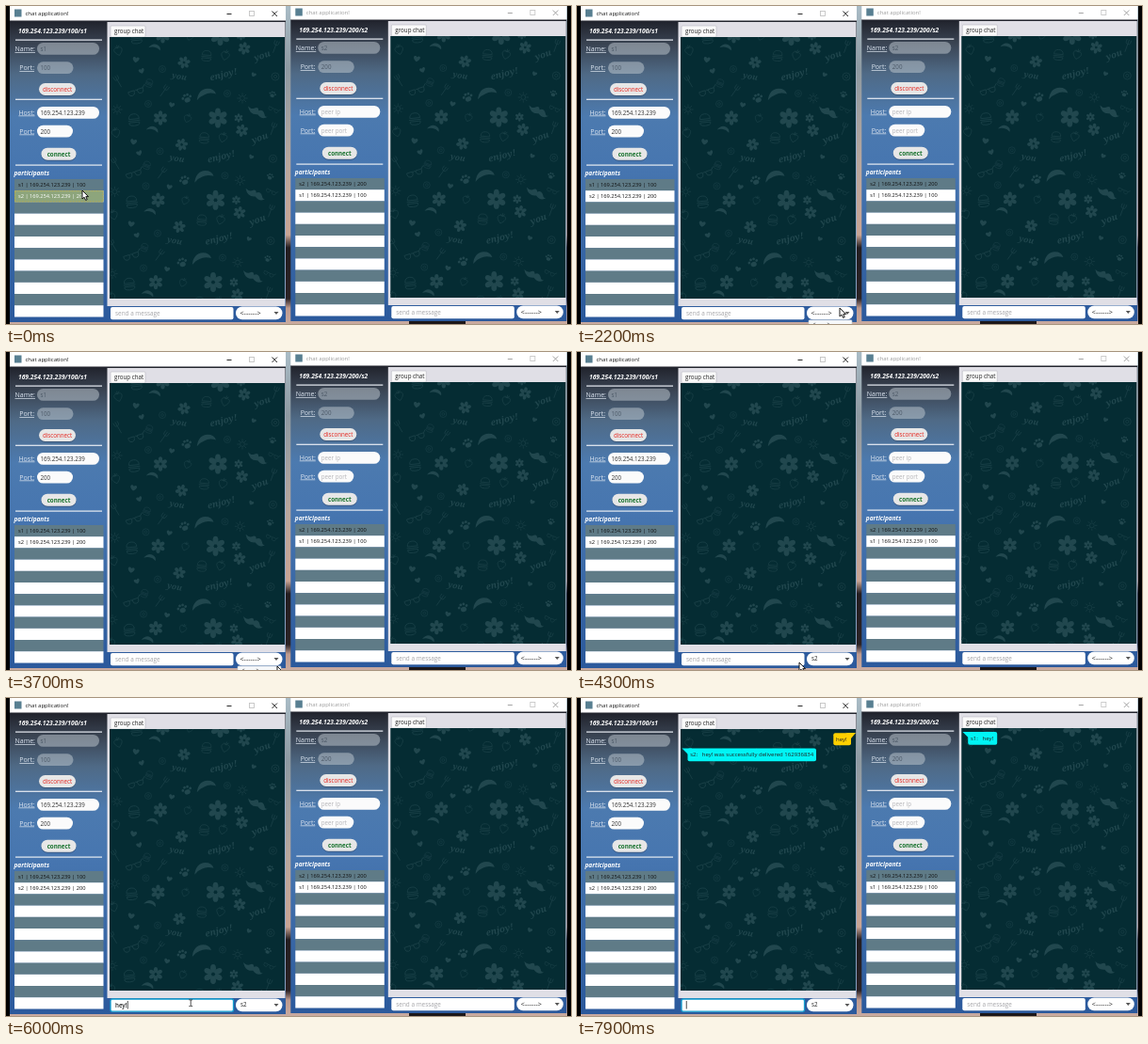
Write an HTML page that moves like this. It is 600x338 px and loops after 8000 ms.

```html
<!DOCTYPE html>
<html lang="en">
<head>
<meta charset="utf-8">
<title>chat application!</title>
<style>
html, body { margin: 0; width: 100%; height: 100%; overflow: hidden; background: #000; }
svg { display: block; width: 600px; height: 338px; }
text { font: 6.2px "Open Sans", "Noto Sans", sans-serif; fill: #222; white-space: pre; }
.label { font-size: 7px; fill: #dde5f0; text-anchor: end; text-decoration: underline; }
.heading { font-weight: 700; font-style: italic; fill: #fff; }
.hint { fill: #a4a4a8; }
.script { font: italic 700 9.5px "Noto Serif", serif; fill: #21474e; text-anchor: middle; }
.solid { fill: #21474e; }
.line { fill: none; stroke: #1b4148; stroke-width: .9; }

/* Timed parts: one shared 8 s loop, hard cuts only. */
.timed { animation: 8s step-end infinite; }
.selected { animation-name: selected; }
.popup { animation-name: popup; }
.before-pick { animation-name: before-pick; }
.after-pick { animation-name: after-pick; }
.before-focus { animation-name: before-focus; }
.after-focus { animation-name: after-focus; }
.typed-1 { animation-name: typed-1; }
.typed-2 { animation-name: typed-2; }
.typed-3 { animation-name: typed-3; }
.typed-4 { animation-name: typed-4; }
.sent { animation-name: sent; }
.caret { animation-name: caret; }
.beam { animation-name: beam; }
.arrow { animation-name: arrow; }
@keyframes selected { 0% { opacity: 1 } 15%, 100% { opacity: 0 } }
@keyframes popup { 0% { opacity: 0 } 27.5% { opacity: 1 } 52.5%, 100% { opacity: 0 } }
@keyframes before-pick { 0% { opacity: 1 } 52.5%, 100% { opacity: 0 } }
@keyframes after-pick { 0% { opacity: 0 } 52.5%, 100% { opacity: 1 } }
@keyframes before-focus { 0% { opacity: 1 } 55%, 100% { opacity: 0 } }
@keyframes after-focus { 0% { opacity: 0 } 55%, 100% { opacity: 1 } }
@keyframes typed-1 { 0% { opacity: 0 } 65% { opacity: 1 } 67.5%, 100% { opacity: 0 } }
@keyframes typed-2 { 0% { opacity: 0 } 67.5% { opacity: 1 } 70%, 100% { opacity: 0 } }
@keyframes typed-3 { 0% { opacity: 0 } 70% { opacity: 1 } 73.75%, 100% { opacity: 0 } }
@keyframes typed-4 { 0% { opacity: 0 } 73.75% { opacity: 1 } 85%, 100% { opacity: 0 } }
@keyframes sent { 0% { opacity: 0 } 85%, 100% { opacity: 1 } }
@keyframes caret {
  0% { opacity: 0; transform: none }
  55% { opacity: 1; transform: none }
  61.25% { opacity: 0; transform: none }
  65% { opacity: 1; transform: translateX(4px) }
  67.5% { opacity: 1; transform: translateX(7.6px) }
  70% { opacity: 1; transform: translateX(11px) }
  73.75% { opacity: 1; transform: translateX(13px) }
  80% { opacity: 0; transform: translateX(13px) }
  85% { opacity: 1; transform: none }
  91.25% { opacity: 0; transform: none }
  97.5%, 100% { opacity: 1; transform: none }
}
@keyframes beam { 0% { opacity: 0 } 55% { opacity: 1 } 96.25%, 100% { opacity: 0 } }
@keyframes arrow {
  0% { transform: translate(81px, 196px) }
  1.25% { transform: translate(82px, 201px) }
  2.5% { transform: translate(82px, 204px) }
  15% { transform: translate(86px, 212px) }
  16.25% { transform: translate(96px, 225px) }
  21.25% { transform: translate(225px, 300px) }
  22.5% { transform: translate(280px, 321px) }
  27.5% { transform: translate(279px, 321px) }
  28.75% { transform: translate(280px, 328px) }
  32.5% { transform: translate(283px, 331px) }
  35% { transform: translate(286px, 333px) }
  41.25% { transform: translate(288px, 334px) }
  47.5% { transform: translate(288px, 340px) }
  53.75% { transform: translate(236px, 330px) }
  55%, 100% { transform: translate(196px, 350px) }
}
</style>
</head>
<body>
<svg id="stage" viewBox="0 0 600 338"></svg>
<script>
const rect = (x, y, w, h, fill, r = 0, extra = '') =>
  `<rect x="${x}" y="${y}" width="${w}" height="${h}" rx="${r}" fill="${fill}" ${extra}/>`;
const text = (x, y, value, style = '', cls = '') =>
  `<text x="${x}" y="${y}" style="${style}" class="${cls}">${value.replace(/</g, '&lt;')}</text>`;
const timed = (name, content) => `<g class="timed ${name}">${content}</g>`;
const repeat = (n, fn) => Array.from({ length: n }, (_, i) => fn(i)).join('');

const petals = repeat(6, i =>
  `<ellipse cy="-5.6" rx="2.7" ry="4" transform="rotate(${i * 60})"/>`);
const rays = repeat(8, i => `<path d="M0-4V-7" transform="rotate(${i * 45})"/>`);

const shapes = {
  flower: `<g class="solid">${petals}</g>`,
  leaf: '<path class="solid" d="M-10 5Q-7-7 3-6 10-5 11 1 4-2-1 0-6 1-10 5Z"/>',
  tache: '<path class="solid" d="M-11-3Q-6 0-3-3 0-5 1-1 5-4 8 1 9 4 12 3 7 8 1 3-7 6-11-3Z"/>',
  paw: `<g class="solid"><ellipse cy="2" rx="3.2" ry="2.6"/><circle cx="-4" cy="-1" r="1.4"/>
    <circle cx="-1.4" cy="-3.4" r="1.4"/><circle cx="1.8" cy="-3.3" r="1.4"/><circle cx="4.2" cy="-.7" r="1.4"/></g>`,
  sun: `<g class="line"><circle r="3"/>${rays}</g>`,
  heart: '<path class="solid" d="M0 4C-8-1-3-6 0-2 3-6 8-1 0 4Z"/>',
  glasses: '<path class="line" d="M-9-2h7v2a3.5 3.5 0 0 1-7 0zM2-2h7v2a3.5 3.5 0 0 1-7 0zM-2-1Q0-3 2-1M9-2l3-3"/>',
  burger: '<path class="line" d="M-6-1Q-6-7 0-7T6-1ZM-7 1H7M-6 3H6V5Q5 7 0 7T-6 5Z"/>',
  ring: '<g class="line"><circle r="5"/><circle r="2"/></g>',
  berry: '<path class="line" d="M0 7C-9 0-5-5 0-3 5-5 9 0 0 7ZM-3-5 0-3 3-6M0-3V-7"/>',
  fork: '<path class="line" d="M0 9V-2M-3-8V-4Q-3-2 0-2T3-4V-8M0-8V-2"/>',
  enjoy: '<text class="script" y="3">enjoy!</text>',
  you: '<text class="script" y="3">you</text>',
};

// shape, x, y, rotation, scale within one band of the wallpaper
const doodles = [
  ['enjoy', 231, 73, -14, 1], ['you', 272, 53, -20, 1], ['you', 184, 75, 10, .9],
  ['flower', 225, 119, 0, 1.1], ['flower', 253, 45, 10, .7], ['flower', 189, 60, 20, .7],
  ['flower', 164, 119, 0, .8], ['tache', 267, 112, 14, 1], ['leaf', 212, 94, -8, 1],
  ['paw', 192, 98, -20, 1], ['paw', 283, 94, 15, .7], ['sun', 251, 98, 0, .8],
  ['heart', 138, 57, 10, .8], ['heart', 144, 69, -20, .7], ['heart', 263, 73, 25, .6],
  ['glasses', 138, 91, -18, .9], ['burger', 136, 121, -6, .9], ['burger', 213, 53, 5, .8],
  ['ring', 166, 67, 0, .7], ['ring', 286, 75, 0, .8], ['berry', 119, 47, -15, .8],
  ['fork', 168, 90, 35, .8], ['berry', 193, 119, 20, .7], ['leaf', 158, 44, 25, .6],
  ['sun', 118, 110, 0, .8], ['fork', 119, 80, -30, .8], ['ring', 151, 104, 0, .7],
  ['berry', 233, 52, 15, .8], ['flower', 247, 119, 0, .5], ['glasses', 284, 110, 25, .6],
  ['fork', 286, 43, 20, .8], ['burger', 152, 82, 20, .6], ['heart', 176, 105, 15, .7],
  ['ring', 235, 93, 0, .7],
];
const band = doodles.map(([shape, x, y, turn, size]) =>
  `<g transform="translate(${x} ${y}) rotate(${turn}) scale(${size})">${shapes[shape]}</g>`).join('');

const pill = (y, w, value, fill, color) =>
  rect(33, y, w, 12.8, fill, 6.4) + text(36.5, y + 8.8, value, `fill:${color}`);
const button = (x, y, w, label, style) =>
  rect(x, y + 1, w, 13, '#24344f', 6.5, 'opacity=".45"') +
  rect(x, y, w, 13, '#e7e7e7', 6.5) +
  text(x + w / 2, y + 8.9, label, `text-anchor:middle;${style}`);
const rule = y => rect(10, y, 92, 1.2, '#e8edf4');

function titleBar(ink, faint) {
  return rect(4, 0, 293, 15.5, '#fff') +
    rect(9, 3.5, 7.5, 8, '#587f91') +
    text(20.5, 10, 'chat application!', `font-size:6px;fill:${ink}`) +
    `<g fill="none" stroke="${ink}" stroke-width=".9">
      <path d="M234.5 8.5h5M282.5 5.5l5.5 5.5m0-5.5l-5.5 5.5"/>
      <rect x="258.5" y="5.5" width="5" height="5" stroke="${faint}"/></g>`;
}

function sidebar({ user, port, host, peer, members }) {
  const peerInk = host === 'peer ip' ? '#b4b4b8' : '#333';
  const dim = 'rgba(190,200,208,.52)';
  return text(13, 29, `169.254.123.239/${port}/${user}`, 'font-size:6.65px', 'heading') +
    rule(35.5) +
    text(31, 48, 'Name:', '', 'label') + pill(39, 66, user, dim, '#4c5967') +
    text(30, 68, 'Port:', '', 'label') + pill(59.3, 38.5, port, dim, '#4c5967') +
    button(35, 82, 39, 'disconnect', 'fill:#e5231c') +
    rule(98.7) +
    text(30.5, 115.5, 'Host:', '', 'label') + pill(107, 66, host, '#fbfbfb', peerInk) +
    text(30, 135.5, 'Port:', '', 'label') + pill(126.7, 38, peer, '#fbfbfb', peerInk) +
    button(37.5, 150.7, 37, 'connect', 'fill:#14702a;font-weight:700') +
    rule(168.5) +
    text(8.5, 179.5, 'participants', 'font-size:6.5px', 'heading') +
    repeat(12, i => rect(9, 184 + i * 12.2, 94.5, 12.3, i % 2 ? '#fff' : '#5f7b87')) +
    members.map((m, i) => text(13, 192.2 + i * 12.2, m, 'font-size:5.7px;fill:#111')).join('');
}

function chat() {
  return rect(107.5, 17, 189, 302, '#e0dfe6') +
    rect(111, 21, 37, 12, '#fafafa', 1, 'stroke="#b8b8c0" stroke-width=".6"') +
    text(115, 29.4, 'group chat') +
    rect(110, 33, 186, 278, '#052c33') +
    `<g clip-path="url(#room)">${repeat(5, i =>
      `<g transform="translate(${2.5 - i * 2.5} ${(i - 1) * 87.3})">${band}</g>`)}</g>` +
    rect(111, 320, 130.5, 13.2, '#fff', 2) +
    rect(244, 319.5, 49.5, 13.7, '#fff', 6.8) +
    '<path d="M284.5 325h5l-2.5 3z" fill="#555"/>';
}

const prompt = text(116, 328.7, 'send a message', 'font-size:6.4px', 'hint');
const nobody = text(248.5, 328.6, '<------>', 'font-size:7.2px');

const frame = (me, ink, faint) =>
  rect(4, 15, 293, 321, 'url(#side)') + titleBar(ink, faint) + sidebar(me) + chat();
const bubble = (tail, x, y, w, h, fill, label) =>
  `<path d="${tail}" fill="${fill}"/>` + rect(x, y, w, h, fill, 2) +
  text(x + 2.7, y + 8.9, label, 'font-size:6px');

const member = (name, port) => `${name} | 169.254.123.239 | ${port}`;
const left = { user: 's1', port: '100', host: '169.254.123.239', peer: '200',
  members: [member('s1', 100), member('s2', 200)] };
const right = { user: 's2', port: '200', host: 'peer ip', peer: 'peer port',
  members: [member('s2', 200), member('s1', 100)] };

const stop = (offset, color) => `<stop offset="${offset}" stop-color="${color}"/>`;
const gradient = (id, stops) =>
  `<linearGradient id="${id}" x2="0" y2="1">${stops.map(s => stop(...s)).join('')}</linearGradient>`;

document.getElementById('stage').innerHTML = `<defs>
  ${gradient('side', [[0, '#20222b'], [.08, '#3a4453'], [.18, '#4f6a86'], [.32, '#4c7aaf'], [.48, '#4776b0'], [1, '#2b599c']])}
  ${gradient('desk', [[0, '#a9bcc6'], [.2, '#8e9aa2'], [.5, '#b9a79d'], [.72, '#c9a494'], [.76, '#241d20'], [.92, '#2b2225'], [.95, '#bd9a8f'], [1, '#c8aaa0']])}
  <clipPath id="room"><rect x="110" y="33" width="186" height="278"/></clipPath>
  </defs>` +
  rect(0, 0, 600, 338, '#000') + rect(4, 0, 592, 338, 'url(#desk)') +
  rect(428, 334, 60, 4, '#1c1719') +
  frame(left, '#111', '#c4c4c4') +
  timed('selected',
    rect(9, 196.2, 94.5, 12.2, '#8da57c') +
    rect(9.5, 196.7, 93.5, 11.2, 'none', 0, 'stroke="#b0aa55" stroke-dasharray="2 1"') +
    text(13, 204.4, left.members[1], 'font-size:5.7px;fill:#fff')) +
  timed('before-focus', prompt) +
  timed('after-focus', rect(111, 320, 130.5, 13.2, '#fff', 2, 'stroke="#159fd0" stroke-width="1.3"')) +
  ['h', 'he', 'hey', 'hey!'].map((s, i) =>
    timed(`typed-${i + 1}`, text(116, 328.7, s, 'font-weight:600'))).join('') +
  timed('caret', rect(115.8, 322, .8, 8.5, '#222')) +
  timed('before-pick', nobody) +
  timed('after-pick', text(249, 328.4, 's2')) +
  timed('popup', rect(246, 333.8, 46, 6, '#f6f8fa', 1, 'stroke="#b9c6d2" stroke-width=".6"') +
    text(250, 341, '<------>')) +
  `<g transform="translate(298.3 -1)">${frame(right, '#9a9a9a', '#c8c8c8')}${prompt}${nobody}</g>` +
  timed('sent',
    bubble('M296 37H286L291 43Z', 272.3, 37.3, 18.7, 13, '#ffd000', 'hey!') +
    bubble('M111.5 53.5H122L118 60Z', 117.5, 53.5, 136.5, 13.8, '#00f5f5',
      's2:   hey! was successfully delivered 162936834') +
    bubble('M409.5 36H420L415.5 42Z', 415.2, 36, 31, 13.7, '#00f5f5', 's1:   hey!')) +
  timed('beam', '<path d="M194.3 320.8h1.4l.5.4.5-.4h1.4M196.2 321v6.4M194.3 327.6h1.4l.5-.4.5.4h1.4" fill="none" stroke="#222" stroke-width=".8"/>') +
  timed('arrow', '<path d="M0 0V9L2.1 7.2 3.6 10.4 5.2 9.7 3.8 6.6H6.5Z" fill="#fff" stroke="#000" stroke-width=".9"/>');
</script>
</body>
</html>
```
